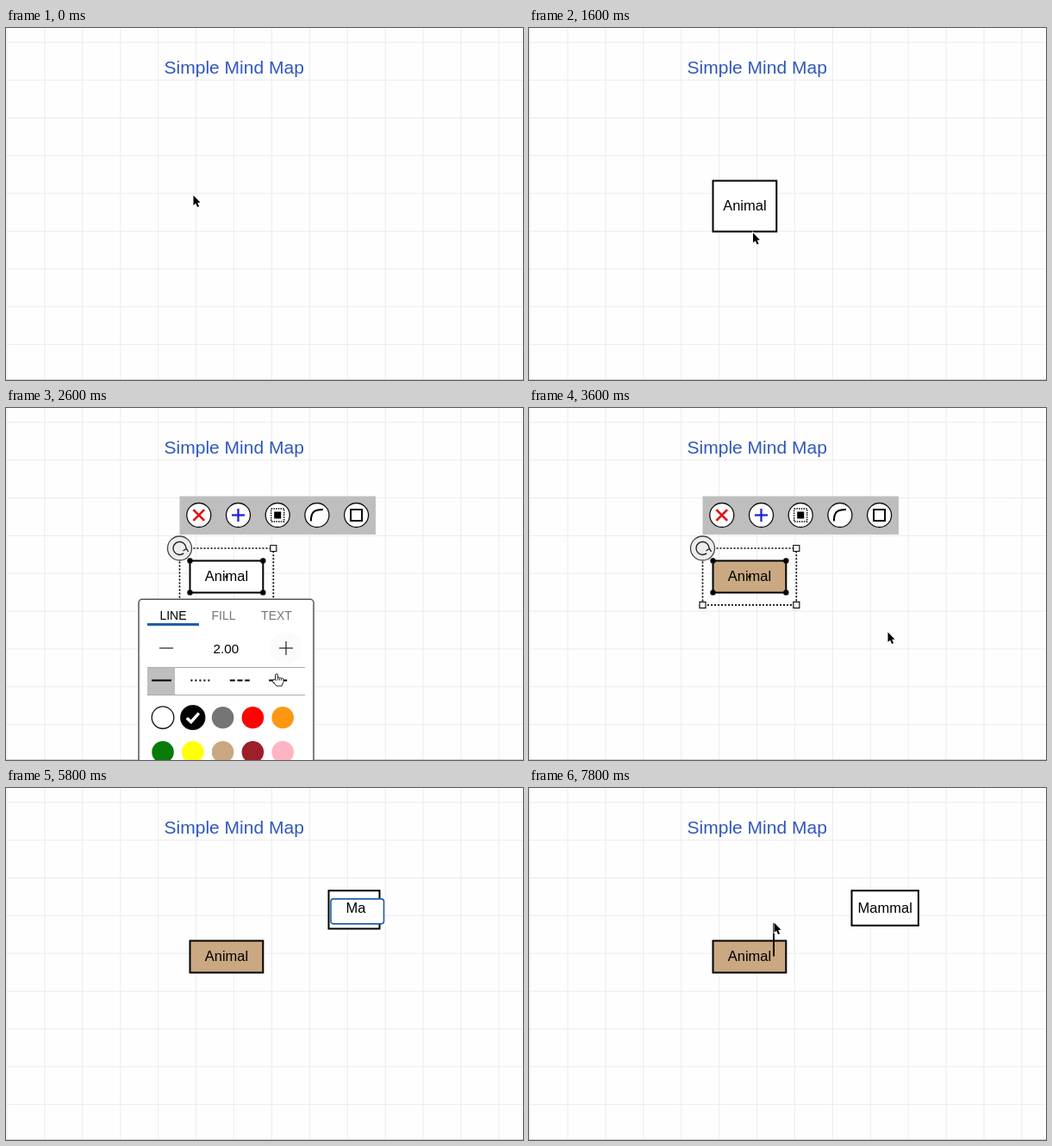
An HTML page with a canvas for the animation above (8000 ms loop, 600 by 409 pixels).

```html
<!DOCTYPE html>
<html lang="en">
<head>
<meta charset="utf-8">
<title>Simple Mind Map</title>
<style>
  html, body { margin: 0; width: 100%; height: 100%; overflow: hidden; background: #fffeff; }
  canvas { display: block; width: 600px; height: 409px; }
</style>
</head>
<body>
<canvas id="stage"></canvas>
<script>
const STEP = 200, STEPS = 40, TAU = Math.PI * 2;
const SANS = '"Liberation Sans", Arial, sans-serif';
const SCALE = 0.922, SNAP = 4; // pixels per drawing unit, size snapping in units
const BLUE = '#1f5ea8', GREY = '#bfbebf', TAN = '#c9a882';
const COLOURS = ['#fff', '#000', '#757577', '#fd0303', '#fd9712',
  '#087a08', '#ffff05', TAN, '#9c1f29', '#ffb4c3'];

// Times are steps; sizes are drawing units.
const ANIMAL = { label: 'Animal', x: 213.5, y: 177.5, pad: 14.5, from: [80, 64], to: [92, 40],
  draw: 1, edit: 4, type: 4, rate: 2, done: 7, select: 9, resize: [9, 11], deselect: 19 };
const MAMMAL = { label: 'Mammal', x: 374.5, y: 119.2, pad: 11.5, from: [64, 48], to: [84, 44],
  draw: 21, edit: 24, type: 27, rate: 1, done: 31, select: 32, resize: [32, 35], deselect: 37 };
const NODES = [ANIMAL, MAMMAL];

// Stops of the pointer: step, x, y.
const STOPS = [
  [0, 217.5, 194.5], [1, 214, 178], [3, 286, 236], [7, 268, 271], [8, 260, 238],
  [11, 310, 229], [12, 315, 122], [13, 314, 309], [14, 253, 238], [16, 251, 314],
  [18, 416.5, 260.5], [20, 478, 392], [23, 432, 162], [34, 455.5, 170],
  [38, 284, 195], [39, 284.5, 156.5]
];

const canvas = document.getElementById('stage');
const ctx = canvas.getContext('2d');
const ratio = window.devicePixelRatio || 1;
canvas.width = 600 * ratio;
canvas.height = 409 * ratio;

const within = (n, a, b) => n >= a && n < b;
const span = (n, a, b) => Math.min(1, Math.max(0, (n - a) / (b - a)));
const mix = (a, b, p) => a + (b - a) * p;
const centre = b => [b.x + b.w / 2, b.y + b.h / 2];

function stroke(color = '#000', width = 1) {
  ctx.strokeStyle = color;
  ctx.lineWidth = width;
  ctx.stroke();
}

function line(points, color, width) {
  ctx.beginPath();
  points.forEach(([x, y]) => ctx.lineTo(x, y));
  stroke(color, width);
}

function disc(x, y, r, fill, edge, width = 1.3) {
  ctx.beginPath();
  ctx.arc(x, y, r, 0, TAU);
  ctx.fillStyle = fill;
  ctx.fill();
  if (edge) stroke(edge, width);
}

const dot = ([x, y], r = 1.7) => disc(x, y, r, '#000');

function text(str, x, baseline, size, color = '#000') {
  ctx.font = `${size}px ${SANS}`;
  ctx.textAlign = 'center';
  ctx.fillStyle = color;
  ctx.fillText(str, x, baseline);
}

function box(x, y, w, h, fill, edge, width, radius = 0) {
  ctx.beginPath();
  ctx.roundRect(x, y, w, h, radius);
  if (fill) {
    ctx.fillStyle = fill;
    ctx.fill();
  }
  if (edge) stroke(edge, width);
}

const square = (x, y, size, fill, edge, width) =>
  box(x - size / 2, y - size / 2, size, size, fill, edge, width);

function dashed(dash, draw) {
  ctx.setLineDash(dash);
  draw();
  ctx.setLineDash([]);
}

function grid() {
  ctx.fillStyle = '#fffeff';
  ctx.fillRect(0, 0, 600, 409);
  for (let i = 0; i < 14; i++) {
    const x = 1 + i * 43.92, y = 16.7 + i * 43.88;
    line([[x, 0], [x, 409]], '#ebeaf0');
    if (y < 400) line([[0, y], [600, y]], '#ebeaf0');
  }
  line([[0, 408.5], [600, 408.5]], '#cfcfd1');
}

function bounds(node, n) {
  const drawn = span(n, node.draw - 0.3, node.draw + 2);
  const resized = span(n, ...node.resize);
  const [w, h] = node.from.map((size, i) =>
    SNAP * Math.round(mix(size * drawn, node.to[i], resized) / SNAP));
  return { x: node.x, y: node.y, w: w * SCALE, h: h * SCALE, size: [w, h] };
}

function editor(b, str, caret) {
  const [x, y] = centre(b);
  box(b.x + 2.5, y - 12.5, b.w + 2.5, 29, '#fff', BLUE, 1.6, 3);
  text(str, x + 2, y + 3.6, 16.5);
  if (caret) {
    const end = x + 3 + ctx.measureText(str).width / 2;
    line([[end, y - 9], [end, y + 7]]);
  }
}

function drawNode(node, n) {
  if (n < node.draw) return;
  const b = bounds(node, n), [x, y] = centre(b);
  box(b.x, b.y, b.w, b.h, node === ANIMAL && n >= 16 ? TAN : '#fff', '#000', 2);
  if (n >= node.done) text(node.label, x, y + 5.1, 16.5);
  else if (n >= node.edit) {
    editor(b, node.label.slice(0, Math.max(0, (n - node.type) * node.rate)), n % 2 === 0);
  }
}

function handles(s) {
  dashed([2, 2], () => box(s.x, s.y, s.w, s.h, null, '#000', 1.7));
  [[1, 0], [0, 1], [1, 1]].forEach(([i, j]) =>
    square(s.x + i * s.w, s.y + j * s.h, 7, '#fff', '#111', 1.2));
  disc(s.x, s.y, 14, '#eeedee', '#444');
  ctx.beginPath();
  ctx.arc(s.x, s.y, 7.5, 0.9, TAU);
  stroke('#222', 1.4);
  line([[s.x + 4, s.y + 3], [s.x + 8, s.y + 0.5], [s.x + 10, s.y + 4]], '#222', 1.4);
}

function toolbar(s) {
  ctx.save();
  ctx.translate(s.x, s.y - 60.5);
  box(0, 0, 227.5, 44.5, GREY);
  const plus = color => {
    line([[-7.5, 0], [7.5, 0]], color, 2.3);
    line([[0, -7.5], [0, 7.5]], color, 2.3);
  };
  const icons = [
    () => { ctx.rotate(TAU / 8); ctx.scale(1.2, 1.2); plus('#e01515'); },
    () => plus('#2020dd'),
    () => {
      dashed([1.5, 1.2], () => square(0, 0, 15, null, '#000', 1.4));
      square(0, 0, 8, '#000');
    },
    () => {
      ctx.beginPath();
      ctx.moveTo(-7, 7);
      ctx.bezierCurveTo(-7, -3, -4, -6.5, 7, -6.5);
      stroke('#000', 2);
    },
    () => square(0, 0, 13, null, '#000', 2)
  ];
  icons.forEach((icon, i) => {
    ctx.save();
    ctx.translate(22.3 + i * 45.7, 22);
    disc(0, 0, 14, '#fff', '#111');
    icon();
    ctx.restore();
  });
  ctx.restore();
}

function selection(node, n) {
  const b = bounds(node, n);
  const s = { x: b.x - 12, y: b.y - node.pad, w: b.w + 24, h: b.h + 2 * node.pad };
  handles(s);
  if (resizing(node, n)) {
    const [w, h] = b.size.map(v => v.toFixed(2));
    text(`width=${w}, height=${h}`, s.x + s.w / 2, s.y - 10, 13.7);
    return;
  }
  for (let i = 0; i < 4; i++) dot([b.x + (i % 2) * b.w, b.y + (i >> 1) * b.h], 3.2);
  dot(centre(b));
  toolbar(s);
}

function swatches(top, picked) {
  COLOURS.forEach((c, i) => {
    const x = 182 + (i % 5) * 34.8, y = top + Math.floor(i / 5) * 40;
    const chosen = i === picked;
    disc(x, y, chosen ? 14 : 12.8, c, chosen || !i ? '#111' : null);
    if (chosen) {
      line([[x - 7, y + 0.5], [x - 2, y + 5], [x + 7, y - 5]], i === 1 ? '#fff' : '#000', 3.5);
    }
  });
}

function panel(tab, picked) {
  box(154, 222.3, 203, 220, '#fff', '#555', 1.5, 4);
  ['LINE', 'FILL', 'TEXT'].forEach((name, i) => {
    const x = 194 + i * 60;
    text(name, x - (i === 1 ? 1.5 : 0), 246, 14, i === tab ? '#000' : '#757575');
    if (i === tab) line([[x - 30, 251.5], [x + 30, 251.5]], BLUE, 3);
  });
  if (tab === 1) return swatches(280, picked);

  disc(325, 279, 18, '#fcfbfc');
  line([[178, 279], [194, 279]], '#222', 1.2);
  line([[317, 279], [333, 279]], '#222', 1.2);
  line([[325, 271], [325, 287]], '#222', 1.2);
  text('2.00', 255.3, 284.5, 15.2);
  box(164, 301.5, 32, 32, GREY);
  [301.5, 333.5].forEach(y => line([[164, y], [347, y]], '#aaa'));
  [[], [2, 3], [6, 2.7], [7, 2, 3, 2]].forEach((dash, i) => {
    const x = 169 + i * 45.4;
    dashed(dash, () => line([[x, 316.5], [x + 23, 316.5]], '#000', 2));
  });
  swatches(359.7, picked);
}

function arrow(x, y) {
  ctx.beginPath();
  [[0, 0], [0, 11.5], [2.6, 9.2], [4.6, 13.6], [6.6, 12.7], [4.7, 8.4], [8, 8.2]]
    .forEach(([a, b]) => ctx.lineTo(x + a, y + b));
  ctx.closePath();
  stroke('#fff', 1.6);
  ctx.fillStyle = '#000';
  ctx.fill();
}

function hand(x, y) {
  box(x - 1.5, y, 3, 9, '#fff', '#222', 1, 1.5);
  for (let i = 0; i < 3; i++) box(x + 1 + i * 2.2, y + 4 + i * 0.5, 2.6, 6, '#fff', '#222', 1, 1.3);
  box(x - 4.5, y + 6.5, 4, 4, '#fff', '#222', 1, 2);
  box(x - 2, y + 7.5, 9.5, 6.5, '#fff', null, 0, 2);
  line([[x - 3.5, y + 10], [x, y + 14], [x + 6, y + 14], [x + 7.5, y + 10]], '#222', 1);
}

function pointer(n) {
  if (NODES.some(node => within(n, node.edit, node.done))) return;
  const next = Math.max(1, STOPS.findIndex(stop => stop[0] >= n));
  const [t0, x0, y0] = STOPS[next - 1], [t1, x1, y1] = STOPS[next];
  const p = span(n, t0, t1);
  (within(n, 12, 17) ? hand : arrow)(mix(x0, x1, p), mix(y0, y1, p));
}

const resizing = (node, n) => n > node.resize[0] && n <= node.resize[1];
const drawing = (node, n) => within(n, node.draw, node.edit);

function render(n) {
  grid();
  text('Simple Mind Map', 264.7, 52.7, 21, '#3058bd');
  NODES.forEach(node => drawNode(node, n));

  // Centre points appear while something is dragged.
  const linking = n === 38;
  if (linking || NODES.some(node => resizing(node, n) || drawing(node, n))) {
    dot([265, 46]);
    NODES.filter(node => n >= node.done).forEach(node => dot(centre(bounds(node, n))));
  }

  NODES.filter(node => within(n, node.select, node.deselect))
    .forEach(node => selection(node, n));
  if (within(n, 13, 18)) panel(n < 15 ? 0 : 1, n < 15 ? 1 : n < 16 ? 0 : 7);
  if (n === 39) line([[284, 195.5], [284, 157]], '#000', 2);
  pointer(n);
}

function tick(now) {
  ctx.setTransform(ratio, 0, 0, ratio, 0, 0);
  render(Math.floor(now / STEP) % STEPS);
  requestAnimationFrame(tick);
}
tick(0);
</script>
</body>
</html>
```
